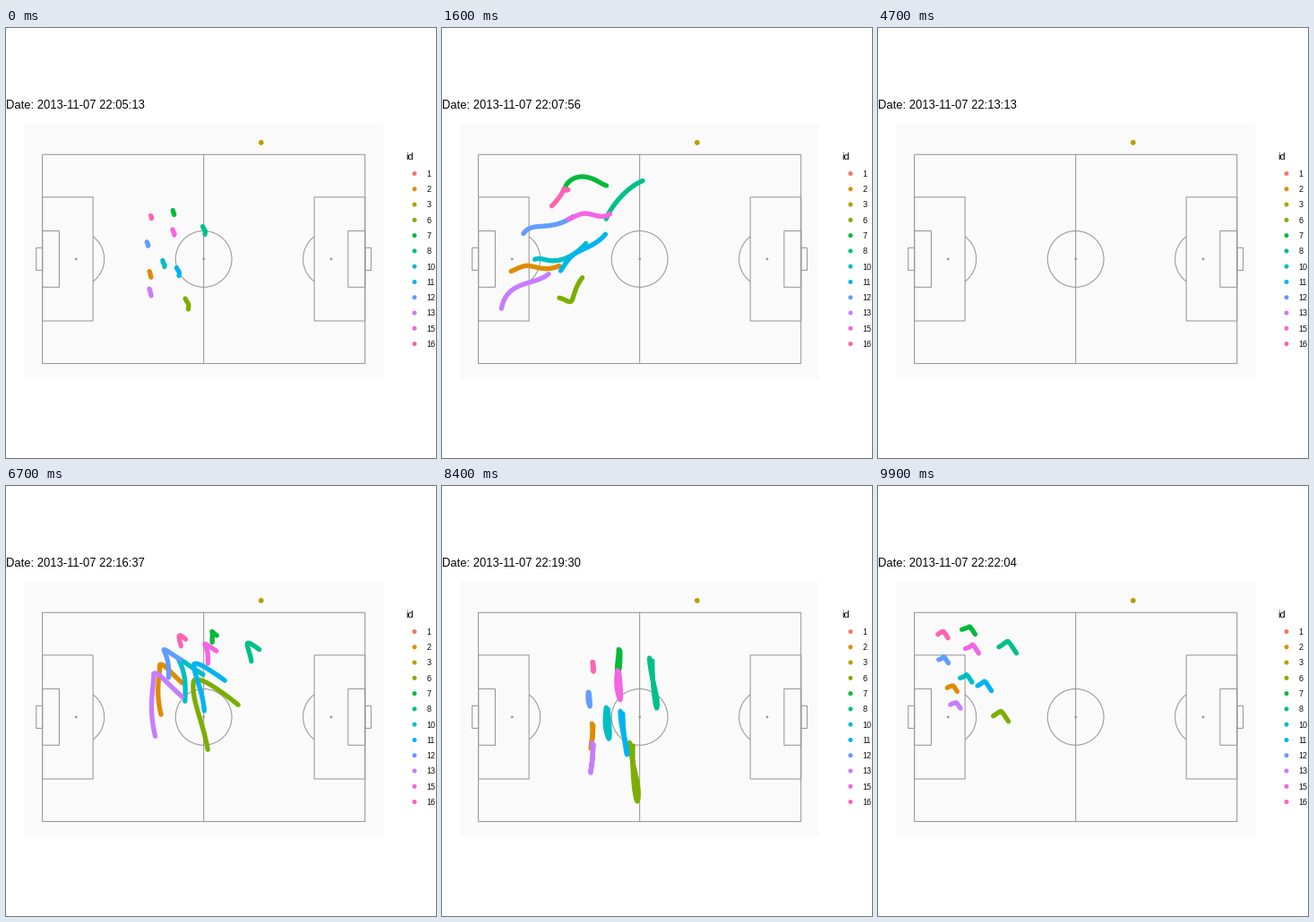
A matplotlib script for the animation above (10 s loop, 480 px wide and 480 px high).

```python
import numpy as np
import matplotlib.pyplot as plt
from matplotlib.animation import FuncAnimation
from matplotlib.patches import Arc, Circle, Rectangle

SIZE, DPI = 480, 72
FRAMES, INTERVAL = 100, 100
GAP = range(28, 61)              # no player data in this stretch
START = 22 * 3600 + 5 * 60 + 13
STEP = 10.212                    # match seconds per frame
GREY = "#999999"

COLORS = {
    1: "#F8766D", 2: "#DE8C00", 3: "#B79F00", 6: "#7CAE00",
    7: "#00BA38", 8: "#00C08B", 10: "#00BFC4", 11: "#00B4F0",
    12: "#619CFF", 13: "#C77CFF", 15: "#F564E3", 16: "#FF64B0",
}

# Team formation: each player's place at kick-off
HOME = {
    2: (161, 275), 6: (202, 308), 7: (187, 206), 8: (221, 226),
    10: (176, 263), 11: (192, 272), 12: (158, 241), 13: (161, 295),
    15: (187, 228), 16: (162, 211),
}
PLAYERS = list(HOME)
places = np.array(list(HOME.values()), float)
OFFSET = places - places.mean(axis=0)


def phase(centre, scale, skew, stem, hook, taper):
    """Team shape: where it stands, how it spreads, and the run it makes."""
    return dict(centre=np.array(centre), scale=np.array(scale), skew=skew,
                stem=np.array(stem), hook=np.array(hook),
                taper=np.array(taper))


KICKOFF = phase(places.mean(axis=0), (1, 1), 0, (2, 5), (0, 2), (.012, .008))
RETREAT = phase((122, 209), (.67, .76), -.09, (42, -38), (-2, -2), (.02, 0))
COUNTER = phase((152, 254), (1.39, 1.33), -.36, (62, -50), (8, 20),
                (-.012, .008))
PRESS = phase((215, 208), (1.39, .85), -.19, (-5, -42), (22, 17), (0, .018))
SHAPE = phase((190, 252), (1.14, 1.21), 0, (2, 38), (0, -36), (.02, .008))
DEFEND = phase((102, 205), (1.18, .94), .18, (8, -4), (6, 9), (.01, 0))

PHASES = {0: KICKOFF, 9: RETREAT, 23: COUNTER, 28: KICKOFF, 60: KICKOFF,
          67: PRESS, 84: SHAPE, 99: DEFEND}
KEYS = sorted(PHASES)

rng = np.random.default_rng(7)
ANGLE = rng.uniform(0, 2 * np.pi, (len(PLAYERS), 4))
RATE = rng.uniform(1.6, 2.6, (len(PLAYERS), 2))
T = np.linspace(0, 1, 60)[:, None]


def run(i, p):
    """A straight stem that turns into a hook, with a light weave."""
    size = max(0.3, 1 + OFFSET[i] @ p["taper"])
    stem, hook = p["stem"] * size, p["hook"] * size
    go = np.sin(np.pi / 2 * np.clip(T / 0.8, 0, 1))
    turn = np.clip((T - 0.6) / 0.4, 0, 1) ** 1.5
    side = np.array([-stem[1], stem[0]])
    path = go * stem + turn * hook \
        + 0.05 * side * np.sin(2 * np.pi * T + ANGLE[i, 0])
    place = p["centre"] + OFFSET[i] * p["scale"]
    place[0] += p["skew"] * OFFSET[i, 1]
    return path + place - (path.min(axis=0) + path.max(axis=0)) / 2


def roam(i, k):
    """Free running between two team shapes."""
    k0 = max(q for q in KEYS if q < k)
    k1 = min(q for q in KEYS if q > k)
    u = k + T[:, 0]
    s = (u - k0 - 1) / (k1 - k0 - 1)
    fade = np.sqrt(np.clip(np.sin(np.pi * s), 0, 1))
    ease = (s * s * (3 - 2 * s))[:, None]
    a, b = run(i, PHASES[k0])[-1], run(i, PHASES[k1])[0]
    g, w = ANGLE[i], RATE[i]
    dx = 10 + 38 * np.sin(0.95 * u) + 11 * np.sin(w[0] * u + g[0]) \
        + 4 * np.sin(5 * u + g[2])
    dy = 20 * np.sin(0.7 * u + 1) + 11 * np.sin(w[1] * u + g[1]) \
        + 4 * np.sin(5.5 * u + g[3])
    path = a + (b - a) * ease + np.column_stack([fade * dx, fade * dy])
    return path.clip((62, 144), (398, 370))


def trail(i, k):
    if k in GAP:
        return np.empty((0, 2))
    return run(i, PHASES[k]) if k in PHASES else roam(i, k)


def draw_pitch(ax):
    m = 3.43                     # pixels per metre
    mid, cy = 220.65, 257.9
    pen = dict(ec=GREY, lw=1.07, fill=False, snap=False)

    def box(x, w, h):
        ax.add_patch(Rectangle((x, cy - h * m / 2), w * m, h * m, **pen))

    def spot(x):
        ax.add_patch(Circle((x, cy), 1.4, fc=GREY, lw=0))

    ax.add_patch(Rectangle((20, 107), 401, 285, fc="#FAFAFA", lw=0))
    box(mid - 52.5 * m, 105, 68)
    ax.plot([mid, mid], [cy - 34 * m, cy + 34 * m], color=GREY, lw=1.07,
            snap=False)
    ax.add_patch(Circle((mid, cy), 9.15 * m, **pen))
    spot(mid)
    half = np.degrees(np.arccos(5.5 / 9.15))
    for side in (1, -1):
        line = mid - side * 52.5 * m
        for w, h in ((16.5, 40.3), (5.5, 18.32), (-2, 7.32)):
            box(line, side * w, h)
        x = line + side * 11 * m
        spot(x)
        ax.add_patch(Arc((x, cy), 18.3 * m, 18.3 * m,
                         angle=0 if side > 0 else 180,
                         theta1=-half, theta2=half, ec=GREY, lw=1.07))


def draw_legend(ax):
    ax.text(446.5, 147, "id", fontsize=11)
    for row, (pid, color) in enumerate(COLORS.items()):
        y = 162.5 + 17.28 * row
        ax.add_patch(Circle((456, y), 2.5, fc=color, lw=0))
        ax.text(469.3, y + 3.4, str(pid), fontsize=9)


plt.rcParams["font.family"] = "Liberation Sans"
plt.rcParams["text.hinting"] = "default"
fig = plt.figure(figsize=(SIZE / DPI, SIZE / DPI), dpi=DPI, facecolor="white")
ax = fig.add_axes([0, 0, 1, 1])
ax.set_xlim(0, SIZE)
ax.set_ylim(SIZE, 0)
ax.axis("off")

draw_pitch(ax)
draw_legend(ax)
ax.add_patch(Circle((284.8, 127.9), 2.9, fc=COLORS[3], lw=0))
stray = ax.add_patch(Circle((139.3, 301.3), 2.7, fc=COLORS[1], lw=0))
title = ax.text(0, 90, "", fontsize=13)
lines = [ax.plot([], [], color=COLORS[p], lw=5.3, solid_capstyle="round",
                 solid_joinstyle="round", zorder=3 + p / 100)[0]
         for p in PLAYERS]


def update(k):
    sec = START + int(0.06 + STEP * k)
    title.set_text(f"Date: 2013-11-07 {sec // 3600:02d}:"
                   f"{sec // 60 % 60:02d}:{sec % 60:02d}")
    for i, line in enumerate(lines):
        line.set_data(*trail(i, k).T)
    stray.set_visible(8 <= k <= 10)
    return [title, stray, *lines]


anim = FuncAnimation(fig, update, frames=FRAMES, interval=INTERVAL,
                     repeat=True, repeat_delay=0)
plt.show()
```
